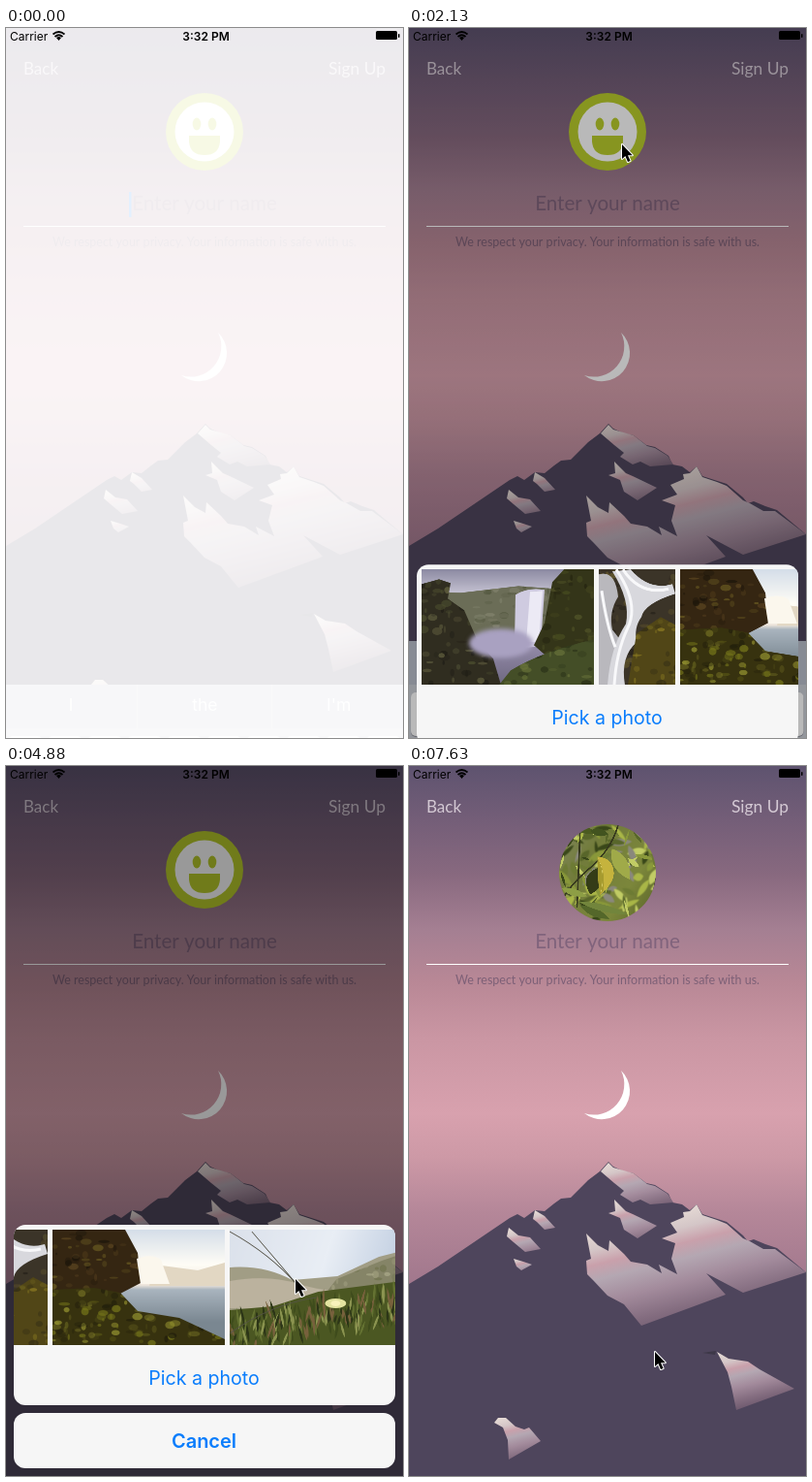
Recreate the animation shown at these times as an HTML page with a canvas. Size 410 px wide and 732 px high, loop 8 s.

```html
<!DOCTYPE html>
<html lang="en">
<head>
<meta charset="utf-8">
<title>Sign up</title>
<style>
  html, body { margin: 0; width: 100%; height: 100%; overflow: hidden; background: #fff; }
  canvas { display: block; width: 410px; height: 732px; }
</style>
</head>
<body>
<canvas id="stage" width="410" height="732"></canvas>
<script>
const W = 410, H = 732, LOOP = 8000, STEP = 88.8;
const UI = 'Inter, sans-serif', SOFT = 'Lato, sans-serif', BLUE = '#0a7dfc';
let c = document.getElementById('stage').getContext('2d');

// ---------- helpers ----------
const mix = (a, b, p) => a + (b - a) * p;

// Piecewise linear track: rows of [step, ...values]
function track(rows, k) {
  let i = rows.findIndex(r => r[0] >= k);
  if (i < 0) return rows[rows.length - 1].slice(1);
  if (i === 0) return rows[0].slice(1);
  const a = rows[i - 1], b = rows[i], p = (k - a[0]) / (b[0] - a[0]);
  return a.slice(1).map((v, j) => mix(v, b[j + 1], p));
}

function fill(d, color) { c.fillStyle = color; c.fill(new Path2D(d)); }
function stroke(d, color, width = 1) {
  c.strokeStyle = color; c.lineWidth = width; c.stroke(new Path2D(d));
}
function rect(x, y, w, h, color) { c.fillStyle = color; c.fillRect(x, y, w, h); }
function round(x, y, w, h, r, color) {
  c.beginPath(); c.roundRect(x, y, w, h, r); c.fillStyle = color; c.fill();
}
function oval(x, y, rx, ry, color) {
  c.beginPath(); c.ellipse(x, y, rx, ry, 0, 0, 7); c.fillStyle = color; c.fill();
}
function text(s, x, y, font, color, align = 'center') {
  c.font = font; c.fillStyle = color; c.textAlign = align; c.fillText(s, x, y);
}
function gradient(x0, y0, x1, y1, stops) {
  const g = c.createLinearGradient(x0, y0, x1, y1);
  stops.forEach(([p, color]) => g.addColorStop(p, color));
  return g;
}
function randomizer(seed) {
  return () => (seed = (seed * 16807) % 2147483647) / 2147483647;
}

// ---------- photos ----------
function photo(w, h, paint) {
  const sheet = document.createElement('canvas'), screen = c;
  sheet.width = w * 2; sheet.height = h * 2;
  c = sheet.getContext('2d');
  c.scale(2, 2);
  paint(w, h);
  c = screen;
  return sheet;
}

// Small random blots inside a shape
function moss(d, base, colors, seed, count) {
  const rnd = randomizer(seed);
  c.save();
  fill(d, base);
  c.clip(new Path2D(d));
  for (let i = 0; i < count; i++) {
    c.globalAlpha = .25 + rnd() * .5;
    oval(rnd() * 178, rnd() * 119, 1 + rnd() * 5, 1 + rnd() * 3, colors[i % colors.length]);
  }
  c.restore();
}

function leaf(x, y, length, width, angle, color) {
  c.save();
  c.translate(x, y); c.rotate(angle);
  fill(`M0 0Q${length * .45} ${-width} ${length} 0Q${length * .45} ${width} 0 0Z`, color);
  c.restore();
}

const gorge = photo(178, 119, (w, h) => {
  rect(0, 0, w, h, gradient(0, 0, 0, h, [[0, '#8d8ba3'], [.2, '#c3c0d0'], [.6, '#9b92b0'], [1, '#6d6780']]));
  moss('M0 22L40 24 100 17 140 20V70H0Z', '#6b6d57', ['#565a42', '#83846f'], 5, 120);
  fill('M97 26Q110 18 127 21L123 78Q104 84 96 74Z', '#cfcbe0');
  fill('M112 23L125 22 121 75H108Z', '#eceaf5');
  moss('M0 15L18 10 30 14 27 30 44 42 58 74 74 92 82 119H0Z', '#302d20', ['#4e5030', '#1f1d16', '#615f3f'], 8, 180);
  c.filter = 'blur(5px)';
  oval(82, 76, 33, 15, '#a9a1c1');
  c.filter = 'none';
  moss('M178 0H147L135 13 127 55 116 78 132 92 178 90Z', '#343519', ['#55582a', '#22220f', '#484b20'], 13, 180);
  moss('M92 104Q125 84 178 72V119H80Z', '#444e27', ['#677239', '#292f17'], 21, 140);
});

const stream = photo(79, 119, (w, h) => {
  rect(0, 0, w, h, '#3b3428');
  moss('M0 0H79V119H0Z', '#3b3428', ['#70622d', '#241f18', '#57502f'], 4, 170);
  fill('M0 5Q17 0 20 28Q10 44 14 62L28 80 20 119H0Z', '#b9b8bd');
  fill('M33 0Q52 22 76 15L79 25Q47 35 44 49Q36 60 39 75Q22 90 27 119H9Q12 80 28 56Q33 32 14 2Z', '#d8d8dd');
  stroke('M18 0Q42 35 30 60T16 119M25 0Q43 27 72 20M3 22Q8 57 17 80', '#f8f8fa', 3);
  moss('M39 66L64 49 79 57V119H30Z', '#514617', ['#8c7b22', '#302a15', '#6c611e'], 9, 170);
});

const falls = photo(178, 119, (w, h) => {
  rect(0, 0, w, h, gradient(0, 0, 0, h, [[0, '#d5dee9'], [.3, '#fffdf6'], [.48, '#eee6dc'], [.52, '#a9b4be'], [.8, '#7a8791']]));
  fill('M105 36L150 42 178 34V58H100Z', '#e2d7c3');
  moss('M0 0H75L88 24 91 55 68 67 0 82Z', '#352612', ['#5b4520', '#1d160b', '#6b5c22'], 17, 210);
  fill('M87 30Q103 24 112 31L121 56H91Z', '#fbf7ed');
  moss('M0 62L43 60 70 65 88 84 131 91 178 113V119H0Z', '#37320f', ['#77771b', '#211e0c', '#55511a', '#939130'], 31, 250);
});

const dunes = photo(179, 119, (w, h) => {
  rect(0, 0, w, h, gradient(0, 0, w, 60, [[0, '#dbe1eb'], [.55, '#e9eef5'], [1, '#bdcbdf']]));
  fill('M0 39Q35 36 65 52L112 48 155 28 179 22V92H0Z', '#a19d85');
  moss('M111 51L158 32 179 25V78H90Z', '#858467', ['#696d45', '#aaa888'], 6, 130);
  fill('M0 53Q40 46 72 56T130 62L90 81H0Z', '#bbb29e');
  const rnd = randomizer(77), greens = ['#3f4c1c', '#647232', '#8b9450', '#2c3517', '#78613d'];
  fill('M0 83L45 79 92 64 179 53V119H0Z', '#4b5722');
  for (let i = 0; i < 190; i++) {
    const x = rnd() * 179, base = 83 - x * .14;
    leaf(x, base + 12 + rnd() * 34, 9 + rnd() * 14, 2.5, -1.9 + rnd() * .7, greens[i % 5]);
  }
  stroke('M0 2Q42 25 70 57M23 2Q48 31 66 52M0 107Q42 77 90 70', '#555347', .8);
  oval(110, 76, 11, 5, '#e3e3a0');
  oval(110, 76, 5, 3, '#f8f2bb');
});

const leaves = photo(386, 257, (w, h) => {
  rect(0, 0, w, h, gradient(0, 0, w, h, [[0, '#8b8e76'], [.35, '#727c3b'], [.65, '#7c873b'], [1, '#454e20']]));
  const rnd = randomizer(42);
  const greens = ['#a9b647', '#58662a', '#c1cc65', '#394719', '#89983a', '#6d7b34', '#8a887c'];
  c.filter = 'blur(3px)';
  for (let i = 0; i < 130; i++)
    leaf(rnd() * w, rnd() * h, 25 + rnd() * 42, 7 + rnd() * 15, rnd() * 6.3, greens[i % 7]);
  c.filter = 'none';
  for (let i = 0; i < 52; i++)
    leaf(rnd() * w, rnd() * h, 22 + rnd() * 34, 5 + rnd() * 9, .2 + rnd() * 2.3, greens[i % 6]);
  stroke('M121 0L112 220M345 0Q328 140 296 257M222 0Q202 70 143 119T55 232', '#35371d', 4);
  leaf(22, 6, 80, 17, .3, '#b9c652');
  leaf(100, 7, 67, 18, .25, '#4b5b20');
  leaf(148, 17, 48, 20, .2, '#42531f');
  leaf(255, 2, 69, 20, .7, '#8c9c5d');
  leaf(205, 65, 94, 37, 1.05, '#a0aa49');
  leaf(167, 116, 73, 42, 1.85, '#343c17');
  leaf(70, 170, 72, 18, .3, '#8d9e45');
  leaf(5, 197, 68, 25, 1.1, '#4b5d24');
  leaf(122, 217, 83, 22, .42, '#54672a');
  leaf(118, 206, 135, 18, .25, '#72853c');
  fill('M166 86Q208 89 210 130Q209 158 173 187Q166 151 166 86Z', '#c5b33d');
  fill('M166 86Q187 121 183 176L173 187Q166 151 166 86Z', '#a69b2f');
  stroke('M168 91Q188 129 175 182', '#d9ce69', 1);
});

const PHOTOS = [[gorge, 13, 178], [stream, 196, 79], [falls, 280, 178], [dunes, 463, 178], [leaves, 646, 179]];

// ---------- landscape ----------
function snow(d, x, top, height) {
  fill(d, gradient(x, top, x + height * .25, top + height, [
    [0, '#e8ddd7'], [.18, '#d4c6c7'], [.3, '#c9a0ab'], [.42, '#b4a7b2'],
    [.6, '#a38b9c'], [.8, '#846d80'], [1, '#665268']]));
}

function landscape() {
  rect(0, 0, W, H, gradient(0, 0, 0, 560, [
    [0, '#5e536f'], [.1, '#745e78'], [.2, '#88697f'], [.3, '#a47f92'], [.4, '#b98896'],
    [.5, '#ca96a3'], [.64, '#d8a1ae'], [.72, '#cd99a6'], [.82, '#b58799'], [1, '#9a7288']]));
  fill('M219 314A29.1 29.1 0 0 1 181 358A31.5 31.5 0 0 0 219 314Z', '#fff');
  fill(`M0 534L30 516 104 466 112 462 119 466 130 458 140 459 150 451 157 446 167 445 178 434
    185 427 197 418 206 408 211 413 222 418 232 420 245 430 254 432 268 441 272 450 282 452 290 458
    297 452 303 462 328 470 345 484 350 490 356 488 368 493 380 497 410 522V732H0Z`, '#4e455c');
  snow('M206 409L211 414 232 420 246 431 254 433 267 441 273 450 249 452 239 447 231 450 218 442 222 438 212 430 198 418Z', 210, 408, 62);
  snow('M212 447L224 459 231 462 256 474 236 487 222 478 218 466 206 461 213 459Z', 220, 446, 55);
  snow(`M297 452L303 463 318 468 328 472 345 487 352 490 366 498 378 498 410 522 345 543 307 523
    327 545 240 577 222 555 205 546 190 530 184 524 183 510 188 508 183 482 195 494 206 500 207 489
    222 503 229 511 246 514 261 523 258 514 277 524 271 508 275 492 261 487 277 481 270 471 284 465 283 460 290 459Z`, 270, 455, 125);
  snow('M103 476L113 484 125 486 136 498 120 501 108 491 101 485Z', 110, 476, 38);
  snow('M130 458L140 464 151 476 140 478 132 470 128 467Z', 135, 458, 32);
  snow('M108 508L118 511 127 514 116 520 111 516Z', 113, 506, 24);
  snow('M318 604L330 611 350 614 362 622 398 642 338 664 333 640 329 625Z', 330, 602, 64);
  snow('M92 672L100 672 110 681 119 684 124 682 136 696 103 715 102 695 97 682 88 677Z', 100, 670, 52);
  fill('M303 605L317 603 316 607Z', '#3d3848');
}

function avatar(chosen) {
  if (chosen) {
    c.save();
    c.beginPath(); c.arc(205, 110, 50, 0, 7); c.clip();
    c.drawImage(leaves, 130, 60, 150, 100);
    c.restore();
    return;
  }
  oval(205, 107, 40, 40, '#bacd2c');
  oval(205, 107, 30.5, 30.5, '#fff');
  oval(197, 99, 4.3, 6.5, '#bacd2c');
  oval(213, 99, 4.3, 6.5, '#bacd2c');
  fill('M189 111H221V117Q220 131 205 131Q190 131 189 117Z', '#bacd2c');
}

function form(k) {
  text('Back', 18, 48, '17px ' + SOFT, '#d4c9d4', 'left');
  text('Sign Up', 392, 48, '17.4px ' + SOFT, '#d4c9d4', 'right');
  text('Enter your name', 205, 188, '20.6px ' + SOFT, '#80637c');
  text('We respect your privacy. Your information is safe with us.', 205, 225, '12.5px ' + SOFT, '#7d6077');
  rect(18, 204, 374, 1, '#fff');
  if (k < 22 && k !== 12 && k !== 13) {
    c.globalAlpha = k === 11 ? .5 : 1;
    rect(127, 169, 2.5, 26, '#1c80f5');
    c.globalAlpha = 1;
  }
}

// ---------- keyboard ----------
function key(x, y, w, label, { dark = false, size = 24 } = {}) {
  round(x, y + 1, w, 45, 5, '#8c8f98');
  round(x, y, w, 45, 5, dark ? '#a5a8b9' : '#fff');
  text(label, x + w / 2, y + (size > 20 ? 30 : 28), `${size > 20 ? 300 : 400} ${size}px ${UI}`, '#000');
}

function keyboard(top) {
  c.save();
  c.translate(0, top);
  rect(0, 0, W, 269, '#cbced6');
  rect(0, 0, W, 45, '#babfcc');
  rect(135, 0, 1, 45, '#cdd0d9');
  rect(274, 0, 1, 45, '#cdd0d9');
  ['I', 'the', "I'm"].forEach((s, i) => text(s, 67 + i * 138.3, 27, '17.5px ' + UI, '#fff'));
  [['qwertyuiop', 2, 53], ['asdfghjkl', 23, 109], ['zxcvbnm', 65, 165]].forEach(([row, x, y]) =>
    [...row].forEach((s, i) => key(x + i * 41.1, y, 35.5, s)));
  const dark = { dark: true, size: 16 };
  key(2, 165, 45, '', dark);
  key(363, 165, 45, '', dark);
  key(2, 221, 46, '123', dark);
  key(54, 221, 46, '', dark);
  key(106, 221, 199, 'space', { size: 16 });
  key(311, 221, 97, 'return', dark);
  c.lineJoin = 'round';
  stroke('M25 179L35 189H30V197H20V189H15ZM381 181H397V196H381L374 188.5ZM384 184.500L392 192.500M392 184.500L384 192.500', '#000', 1.4);
  c.beginPath(); c.arc(77, 243.500, 10, 0, 7); c.stroke();
  oval(73.500, 240, 1.2, 1.8, '#000');
  oval(80.500, 240, 1.2, 1.8, '#000');
  stroke('M70.500 245H83.500Q82 251 77 251T70.500 245Z', '#000', 1.2);
  c.restore();
}

// ---------- photo picker ----------
function picker(k, drop) {
  const [scroll] = track([[41, 0], [42, 18], [45, 105], [48, 180], [52, 224], [55, 232], [57, 260],
    [60, 345], [63, 407], [67, 428]], k);
  const [grow] = track([[70, 0], [71, .35], [72, .8], [73, 1]], k);
  const height = mix(119, 257, grow), scale = height / 119;
  const left = mix(646 - scroll, 12, grow), top = 597 - height;
  c.save();
  c.translate(0, drop);
  round(8, 667, 394, 57, 12, '#f6f6f6');
  text('Cancel', 204.5, 703, '600 20px ' + UI, BLUE);
  round(8, top - 5, 394, 667 - 3 - top, 12, '#f6f6f6');
  c.save();
  c.clip();
  for (const [image, x, w] of PHOTOS)
    c.drawImage(image, left + (x - 646) * scale, top, w * scale, height);
  c.restore();
  text(k < 72 ? 'Pick a photo' : 'Use this photo', 204.5, 638, '19.6px ' + UI, BLUE);
  if (grow === 1) {
    oval(374, 573, 11, 11, '#fff');
    oval(374, 573, 10, 10, BLUE);
    stroke('M368.500 573.500L372 577.500 380 569', '#fff', 1.3);
  }
  c.restore();
}

// ---------- overlays ----------
function statusBar() {
  text('Carrier', 4, 13, '12px ' + UI, '#000', 'left');
  text('3:32 PM', 206.5, 13, '600 12px ' + UI, '#000');
  stroke('M48.500 6.500Q54.500 1.500 60.500 6.500M50.500 9Q54.500 5.500 58.500 9', '#000', 1.7);
  fill('M52 10Q54.500 8 57 10L54.500 13Z', '#000');
  round(382, 3, 22, 9, 1.5, '#000');
  round(405, 6, 1.5, 4, 1, '#000');
}

function pointer(k) {
  if (k < 11) return;
  const [x, y] = track([[11, 308, 244], [12, 299, 243], [14, 299, 243], [15, 284, 222], [16, 252, 170],
    [17, 228, 131], [18, 220, 120], [32, 220, 120], [33, 198, 258], [34, 191, 476], [35, 191, 476],
    [40, 225, 547], [41, 225, 547], [45, 120, 545], [47, 112, 543], [54, 292, 529], [55, 299, 529],
    [56, 288, 529], [60, 192, 532], [62, 198, 530], [66, 278, 522], [67, 281, 522], [76, 281, 522],
    [78, 266, 565], [80, 254, 604]], k);
  c.save();
  c.translate(x, y);
  c.lineJoin = 'round';
  const arrow = 'M0 0V15L3.400 12 6 18 8.600 17 6 11.200H10.800Z';
  stroke(arrow, '#fff', 2);
  fill(arrow, '#000');
  c.restore();
}

function draw(k) {
  const [veil] = track([[0, .88], [1, .76], [3, .43], [5, .13], [7, 0]], k);
  const [keysTop] = track([[0, 677], [1, 614], [2, 558], [3, 515], [5, 473], [7, 463],
    [21, 463], [22, 485], [23, 553], [24, 632], [25, 692], [26, 723], [27, 732]], k);
  const [shown] = track([[21, 0], [22, .1], [23, .38], [24, .69], [25, .88], [26, .97], [27, 1],
    [82, 1], [83, .85], [84, .47], [85, .13], [86, 0]], k);

  landscape();
  avatar(k >= 83);
  form(k);
  if (keysTop < H) keyboard(keysTop);
  rect(0, 0, W, H, `rgba(255,255,255,${veil})`);
  statusBar();
  if (shown > 0) {
    rect(0, 0, W, H, `rgba(0,0,0,${shown * .4})`);
    picker(k, (1 - shown) * (k < 70 ? 259 : 397));
  }
  pointer(k);
}

const start = performance.now();
function frame() {
  const t = (performance.now() - start) % LOOP;
  draw(Math.floor((t + 14) / STEP));
  requestAnimationFrame(frame);
}
frame();
</script>
</body>
</html>
```
